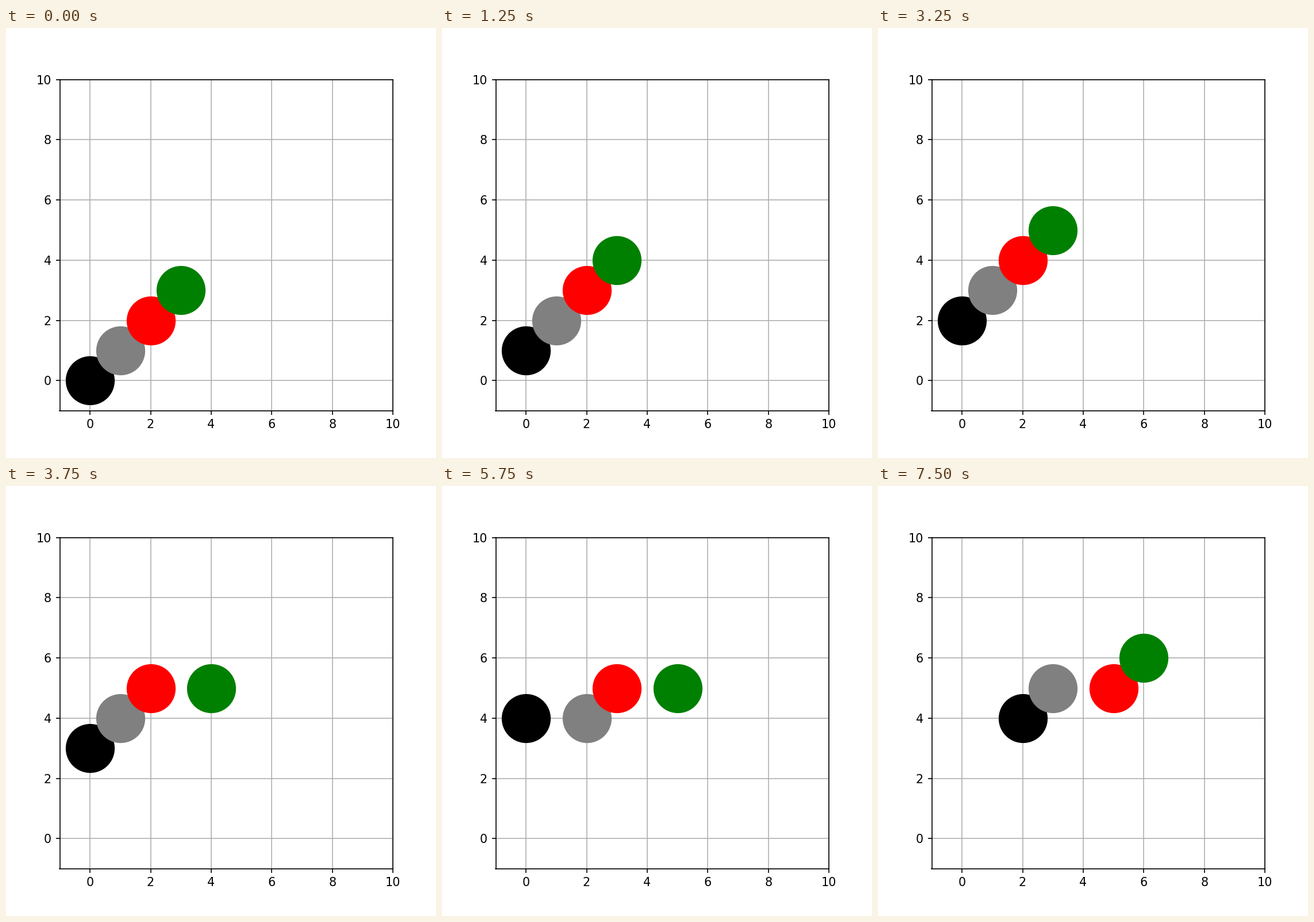
A matplotlib script for the animation above (8 s loop, 748 px wide and 748 px high).

```python
import numpy as np
import matplotlib.pyplot as plt
from matplotlib.animation import FuncAnimation

INTERVAL = 250
FRAMES = 32
FRAMES_PER_STEP = 5

STEPS = {"U": (0, 1), "R": (1, 0)}

# colour, start cell and moves of each walker
WALKERS = [
    ("black", (0, 0), "UUUURR"),
    ("gray", (1, 1), "UUURRU"),
    ("red", (2, 2), "UUURRR"),
    ("green", (3, 3), "UURRRU"),
]


def walk(start, moves):
    return np.cumsum([start] + [STEPS[m] for m in moves], axis=0)


fig = plt.figure(figsize=(5, 5), dpi=149.6, facecolor="white")
ax = fig.add_axes([0.125, 0.11, 0.775, 0.77])
ax.set(xlim=(-1, 10), ylim=(-1, 10),
       xticks=range(0, 11, 2), yticks=range(0, 11, 2))
ax.grid(True)

paths = [walk(start, moves) for _, start, moves in WALKERS]
dots = [ax.plot([], [], "o", ms=40, color=color)[0] for color, _, _ in WALKERS]


def update(frame):
    step = frame // FRAMES_PER_STEP
    for dot, path in zip(dots, paths):
        x, y = path[step]
        dot.set_data([x], [y])
    return dots


anim = FuncAnimation(fig, update, frames=FRAMES, interval=INTERVAL,
                     repeat=True, repeat_delay=0)
plt.show()
```
